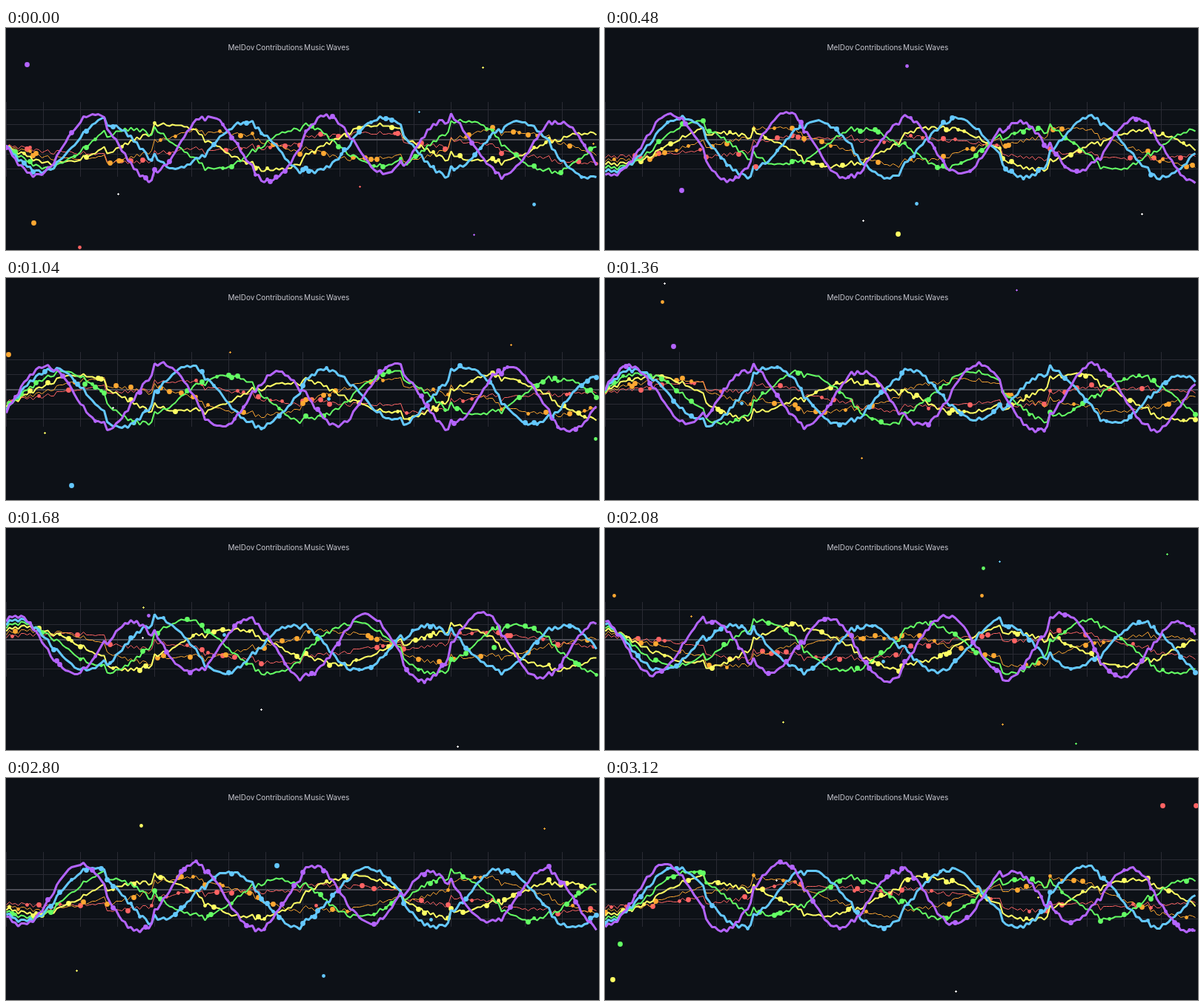
Recreate the animation shown at these times as an HTML page with a canvas. Size 800 by 300 pixels, loop 3200 ms.

```html
<!DOCTYPE html>
<html lang="en">
<head>
<meta charset="utf-8">
<title>Music Waves</title>
<style>
html, body { margin: 0; width: 100%; height: 100%; overflow: hidden; background: #0d1117; }
canvas { position: absolute; left: 0; top: 0; }
.title {
  position: absolute; left: 299.5px; top: 20px;
  font: 10px/13px Inter, "Liberation Sans", sans-serif;
  word-spacing: -1.3px; white-space: nowrap; color: #c8c8d0;
}
</style>
</head>
<body>
<canvas width="800" height="300"></canvas>
<div class="title">MelDov Contributions Music Waves</div>
<script>
const W = 800, H = 300, STEP_MS = 80, STEPS = 40, DX = 4;
const PERIOD = 100; // points after which the resting line repeats
const ctx = document.querySelector('canvas').getContext('2d');
const colors = ['#ff6464', '#ffa832', '#ffff64', '#64ff64', '#64c8ff', '#b464ff'];
const levels = [159, 156, 166, 154, 161, 166.5];

function random(seed) {
  let s = seed * 2654435761 >>> 0;
  return () => {
    s = s + 0x6d2b79f5 >>> 0;
    let t = Math.imul(s ^ s >>> 15, s | 1);
    t ^= t + Math.imul(t ^ t >>> 7, t | 61);
    return ((t ^ t >>> 14) >>> 0) / 4294967296;
  };
}

const jitter = random(7);
const rest = Array.from({ length: PERIOD }, (_, i) =>
  levels[Math.floor(i * levels.length / PERIOD)] + (jitter() - 0.5) * 5.5);

function rect(x, y, w, h, color) {
  ctx.fillStyle = color;
  ctx.fillRect(x, y, w, h);
}

function dot(x, y, r, color) {
  if (r === 1) {
    rect(x - 1, y, 3, 1, color);
    rect(x, y - 1, 1, 3, color);
    return;
  }
  ctx.fillStyle = color;
  ctx.beginPath();
  ctx.arc(x + 0.5, y + 0.5, r + 0.4, 0, Math.PI * 2);
  ctx.fill();
}

function drawGrid() {
  rect(0, 0, W, H, '#0d1117');
  for (let x = 0; x < W; x += 50) rect(x, 100, 1, 101, '#2a2b34');
  for (let y = 110; y <= 190; y += 20) rect(0, y, W, 1, '#2a2b34');
  rect(0, 150, W, 2, '#4c4d56');
}

function drawWave(n, step, rnd) {
  const freq = 0.01 + n * 0.006, amp = 15 + n * 5;
  const points = Array.from({ length: W / DX }, (_, i) => {
    const x = i * DX;
    return [x, Math.round(rest[i % PERIOD] + amp * Math.sin(x * freq + step * 0.2))];
  });
  ctx.strokeStyle = colors[n];
  ctx.lineWidth = 1 + Math.floor(n / 2);
  ctx.beginPath();
  for (const [x, y] of points) ctx.lineTo(x + 0.5, y + 0.5);
  ctx.stroke();
  for (const [x, y] of points) {
    if (rnd() < 0.11) dot(x, y, rnd() < 0.4 ? 2 : 3, colors[n]);
  }
}

function drawSparks(rnd) {
  const pick = n => Math.floor(rnd() * n);
  const count = 6 + pick(5);
  for (let i = 0; i < count; i++) {
    const r = Math.max(1, pick(4));
    const color = r === 1 && rnd() < 0.4 ? '#ffffff' : colors[pick(6)];
    dot(pick(W), pick(H), r, color);
  }
}

function draw(step) {
  const rnd = random(step + 11);
  drawGrid();
  colors.forEach((_, n) => drawWave(n, step, rnd));
  drawSparks(rnd);
}

ctx.lineJoin = 'bevel';
let shown = -1;
function tick() {
  const step = Math.floor(performance.now() / STEP_MS) % STEPS;
  if (step !== shown) draw(shown = step);
  requestAnimationFrame(tick);
}
tick();
</script>
</body>
</html>
```
